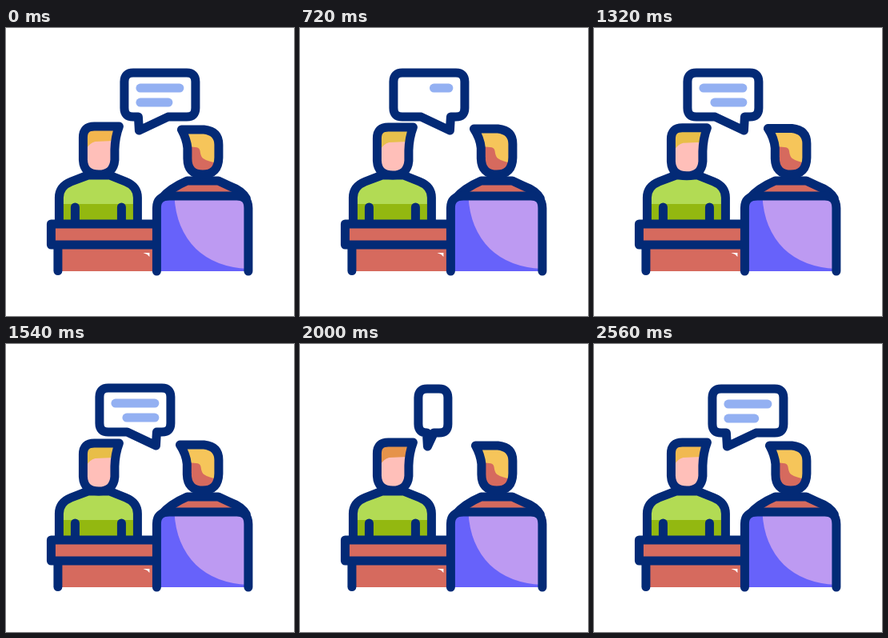
Recreate the animation shown at these times as an HTML page with a canvas. Size 360x360 px, loop 3000 ms.

```html
<!DOCTYPE html>
<html lang="en">
<head>
<meta charset="utf-8">
<title>Conversation</title>
<style>
  html, body { margin: 0; width: 100%; height: 100%; overflow: hidden; background: #fff; }
  canvas { display: block; width: 360px; height: 360px; }
</style>
</head>
<body>
<canvas id="stage"></canvas>
<script>
const LOOP = 3000, ACTIVE = 2560, SWITCH = 1510, EXIT = 550;
const NAVY = '#032a76', RED = '#d66a5e', TEXT = '#93b0f2';
const canvas = document.getElementById('stage');
const ctx = canvas.getContext('2d');
const ratio = window.devicePixelRatio || 1;
canvas.width = canvas.height = 360 * ratio;

const clamp = v => Math.min(1, Math.max(0, v));
const mix = (a, b, k) => a + (b - a) * k;
const ease = k => 0.5 - 0.5 * Math.cos(Math.PI * clamp(k));

// Eased value between [time, value] keys
function track(t, keys) {
  for (let i = 1; i < keys.length; i++) {
    const [t0, a] = keys[i - 1], [t1, b] = keys[i];
    if (t <= t1) return mix(a, b, ease((t - t0) / (t1 - t0)));
  }
  return keys[keys.length - 1][1];
}

function fill(d, color) {
  ctx.fillStyle = color;
  ctx.fill(new Path2D(d));
}

function line(d, color = NAVY, width = 11) {
  ctx.strokeStyle = color;
  ctx.lineWidth = width;
  ctx.stroke(new Path2D(d));
}

function shifted(dx, dy, draw) {
  ctx.save();
  ctx.translate(dx, dy);
  draw();
  ctx.restore();
}

function hairColor(t) {
  const steps = [[170, '#f3b64e'], [530, '#ffa21e'], [890, '#e7c04c'], [1300, '#ec6f26'],
                 [1770, '#e8be48'], [2280, '#e6934a'], [LOOP, '#f1b950']];
  return steps.find(([end]) => t < end)[1];
}

function leftPerson(t) {
  const body = 'M67 245V212Q67 198 82 192L103 184H130L150 192Q165 198 165 212V245';
  fill(body, '#b2db54');
  fill('M67 220H165V245H67Z', '#93b810');
  line(body);
  line('M87 224V242M145 224V242');

  const nod = track(t, [[0, 0], [340, 4], [720, 1], [1060, 3], [1540, 1], [2000, 0]]);
  const head = 'M142 123H111Q97 123 97 137V165Q98 183 116.500 183Q135 183 136.500 165V152Q137 136 142 123Z';
  shifted(0, nod, () => {
    fill(head, '#ffbfb9');
    fill('M97 123H141L135 141L112 142Q105 144 101 151H97Z', hairColor(t));
    line(head);
  });
}

function desk() {
  fill('M65 271H190V304H65Z', RED);
  fill('M172 281H180V286L177 283Z', '#fff');
  line('M65.500 271V303.500');
  fill('M57 245H190V271H57Z', RED);
  line('M57 245H190V271H57Z');
}

function rightPerson(t) {
  const shoulders = 'M195 213Q206 200 227 191H266L281 198Q295 203 301 213';
  fill(shoulders, RED);
  line(shoulders);

  const dy = track(t, [[0, 0], [340, -4], [720, -1], [1060, -2], [1540, -1], [2000, 0]]);
  const lean = track(t, [[0, 0], [340, -2], [1540, -2], [2000, 0]]);
  const top = 127 + dy, x = 220 + lean, side = 227.5 + lean * 0.3, sway = -dy;
  const head = `M${x} ${top}H248Q266.500 ${top + 2} 266.500 ${top + 19}V162Q266 183 246.500 183
    Q227.500 183 ${side} 163V150Q${side - 1} ${top + 12} ${x} ${top}Z`;
  fill(head, RED);
  fill(`M${x} ${top}H248Q266 ${top + 2} 266 ${top + 19}V169Q${253 + sway} 167 ${247 + sway} 163
    Q${244 + sway} 161 ${243 + sway} 153Q${242 + sway} 149 ${237 + sway} 149L${side} 148
    Q${side - 1} ${top + 12} ${x} ${top}Z`, '#f6c55a');
  line(head);
}

function chair() {
  const seat = 'M189 304V225Q189 210 205 210H289Q303.500 210 303.500 225V304';
  fill(seat, '#6762fa');
  fill('M211 210H289Q303 210 303 225V301Q262 299 238 276Q213 251 211 210Z', '#bd9af2');
  line(seat);
}

// Grows out of the tail, widens, then writes its two lines
function bubble(phase, shift) {
  if (phase < 240) return;
  const x0 = track(phase, [[240, 160], [340, 151], [430, 148.5]]);
  const x1 = track(phase, [[240, 160], [340, 171], [490, 185.5], [690, 237.5]]);
  const y0 = track(phase, [[240, 126], [340, 74.5], [440, 55.5]]);
  const y1 = track(phase, [[240, 126], [340, 114.5], [440, 110.5]]);
  const k = clamp((x1 - 185.5) / 52);
  const r = Math.min(11, (x1 - x0) / 2, (y1 - y0) / 2);
  const start = Math.min(mix(159, 166, k), x1), end = Math.min(mix(168, 203, k), x1 - r);
  const tip = mix(160, 167, k);
  const shape = `M${x0 + r} ${y0}H${x1 - r}Q${x1} ${y0} ${x1} ${y0 + r}V${y1 - r}
    Q${x1} ${y1} ${x1 - r} ${y1}H${Math.max(end, x0 + r)}L${tip} 127.500L${start} ${y1}
    H${x0 + r}Q${x0} ${y1} ${x0} ${y1 - r}V${y0 + r}Q${x0} ${y0} ${x0 + r} ${y0}Z`;
  shifted(0, shift + 0.6, () => {
    fill(shape, '#fff');
    line(shape);
    writeLine(74.5, 49, (phase - 640) / 190);
    writeLine(92.5, 35, (phase - 840) / 250);
  });
}

function writeLine(y, length, k) {
  if (k > 0) line(`M168.500 ${y}h${Math.max(0.01, length * ease(k))}`, TEXT);
}

function mirrored(draw) {
  shifted(355, 0, () => {
    ctx.scale(-1, 1);
    draw();
  });
}

const exitShift = t => -140 * ease(t / EXIT);

function render(t) {
  ctx.setTransform(ratio, 0, 0, ratio, 0, 0);
  ctx.fillStyle = '#fff';
  ctx.fillRect(0, 0, 360, 360);
  ctx.lineCap = ctx.lineJoin = 'round';

  shifted(-0.6, 0, () => {
    leftPerson(t);
    desk();
    rightPerson(t);
    chair();
    if (t < EXIT) bubble(LOOP, exitShift(t));
    if (t < SWITCH + EXIT) mirrored(() => bubble(t, exitShift(t - SWITCH)));
    bubble(t - SWITCH, 0);
  });
}

function tick() {
  const now = performance.now() % LOOP;
  render(Math.min(ACTIVE, Math.floor(now / 20) * 20));
  requestAnimationFrame(tick);
}
tick();
</script>
</body>
</html>
```
